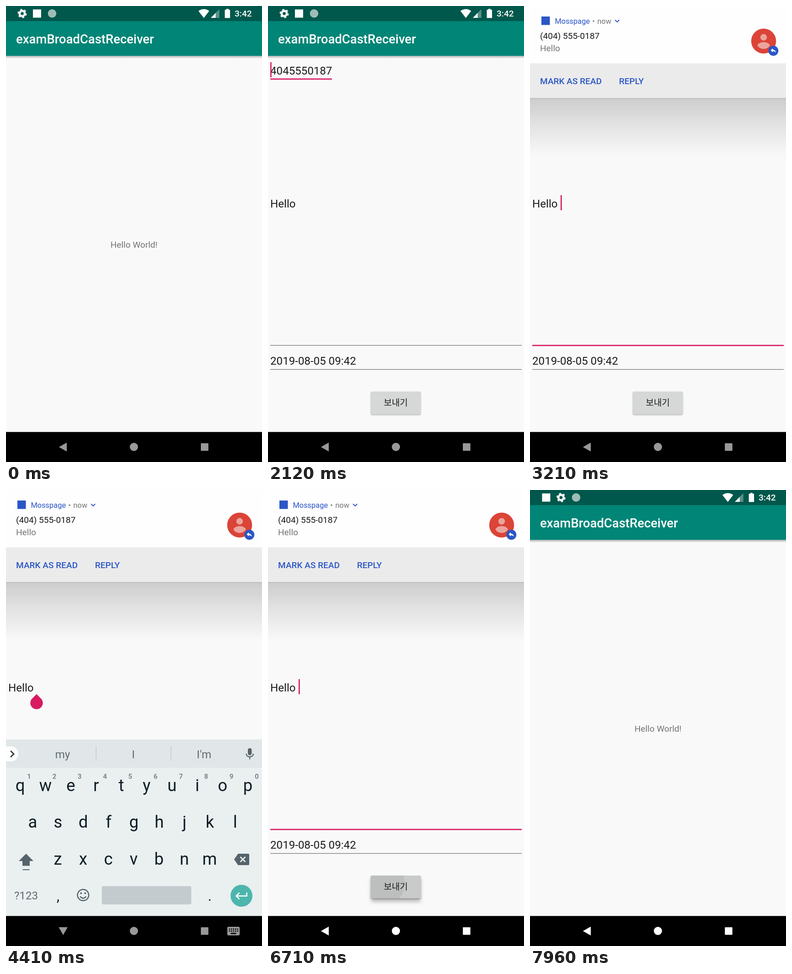
An HTML page that plays this animation: 561 px wide and 998 px high, repeating every 8 s.

```html
<!DOCTYPE html>
<html lang="en">
<head>
<meta charset="utf-8">
<title>examBroadCastReceiver</title>
<style>
html, body { margin: 0; width: 100%; height: 100%; overflow: hidden; background: #f9f9fa; }
#stage { position: relative; width: 561px; height: 998px; max-height: 100%; overflow: hidden; contain: strict; }
svg { position: absolute; left: 0; top: 0; }
text { font-family: Roboto, "Noto Sans CJK KR", "Noto Sans CJK", sans-serif; font-size: 19.1px; white-space: pre; }
.mid { text-anchor: middle; }
.med { font-weight: 500; }
.field { font-size: 24.15px; fill: #1c1c1c; }
.grey { fill: #757575; }
.blue { fill: #2a56c6; }
.small { font-size: 16.4px; }
.key { font-size: 36.5px; fill: #0d1c24; text-anchor: middle; }
.digit { font-size: 15px; font-weight: 700; fill: #7b878d; text-anchor: middle; }
.hint { font-size: 24.2px; fill: #5f6c72; text-anchor: middle; }
.tool { fill: #56646b; }

/* 8 s loop: 1% = 80 ms */
.slide { animation: 8s cubic-bezier(.4, 0, .2, 1) infinite; }
.step { animation: 8s step-end infinite; }

#form { animation-name: form; }
#banner { animation-name: banner; }
#scrim { animation-name: scrim; }
#keys { animation-name: keys; }
#back { animation-name: back; transform-origin: 125px 965px; }
#gear { animation-name: gear; }
#note { animation-name: note; }
#nav { animation-name: nav; }
#kbIcon { animation-name: typing; }
#handle { animation-name: handle; }
#caret1 { animation-name: caret1; }
#caret2 { animation-name: caret2; }
#idleLine { animation-name: idle; }
#focusLine { animation-name: focus; }
#lift, #press { animation-name: press; }
#ripple { animation-name: ripple; transform-origin: 250px 862px; }

@keyframes form {
  0%, 19.5% { clip-path: inset(96% 0 0 0); transform: translateY(41px); visibility: hidden; }
  19.6% { clip-path: inset(96% 0 0 0); transform: translateY(41px); visibility: visible; }
  24.4%, 87% { clip-path: inset(0); transform: none; visibility: visible; }
  92% { clip-path: inset(96% 0 0 0); transform: translateY(41px); visibility: visible; }
  92.1%, 100% { clip-path: inset(96% 0 0 0); transform: translateY(41px); visibility: hidden; }
}
@keyframes banner {
  0%, 29.5% { transform: translateY(-215px); }
  33%, 96.2% { transform: none; }
  98.8%, 100% { transform: translateY(-215px); }
}
@keyframes scrim { 0%, 29.5% { opacity: 0; } 33%, 96.2% { opacity: 1; } 98.8%, 100% { opacity: 0; } }
@keyframes keys {
  0%, 45% { transform: translateY(116px); opacity: 0; }
  48%, 68.1% { transform: none; opacity: 1; }
  70.6%, 100% { transform: translateY(116px); opacity: 0; }
}
@keyframes back {
  0%, 45% { transform: none; }
  47.5%, 68.1% { transform: rotate(-90deg); }
  70.6%, 100% { transform: none; }
}
@keyframes gear { 0% { transform: translate(35.5px, 16.5px); } 32%, 100% { transform: translate(68px, 16.5px); } }
@keyframes note { 0% { transform: translate(68px, 16.5px); } 32%, 100% { transform: translate(35.5px, 16.5px); } }
@keyframes nav { 0% { fill: #999; } 67.5%, 100% { fill: #fff; } }
@keyframes typing { 0% { opacity: 0; } 45% { opacity: 1; } 68.1%, 100% { opacity: 0; } }
@keyframes handle { 0% { opacity: 0; } 43.1% { opacity: 1; } 68.1%, 100% { opacity: 0; } }
@keyframes caret1 { 0% { opacity: 0; } 23.75% { opacity: 1; } 30%, 100% { opacity: 0; } }
@keyframes caret2 {
  0%, 49.375%, 61.875%, 75%, 87.5%, 100% { opacity: 0; }
  38.75%, 55.625%, 68.75%, 81.25% { opacity: 1; }
}
@keyframes idle { 0% { opacity: 1; } 38.75%, 100% { opacity: 0; } }
@keyframes focus { 0% { opacity: 0; } 38.75%, 100% { opacity: 1; } }
@keyframes press { 0%, 82.5% { opacity: 0; } 83.6%, 86% { opacity: 1; } 89%, 100% { opacity: 0; } }
@keyframes ripple {
  0%, 82.4% { transform: scale(.1); opacity: 0; }
  82.5% { transform: scale(.1); opacity: 1; animation-timing-function: linear; }
  83.9% { transform: scale(.52); opacity: 1; animation-timing-function: linear; }
  85.8% { transform: scale(1); opacity: 1; }
  89%, 100% { transform: scale(1); opacity: 0; }
}
</style>
</head>
<body>
<div id="stage">

<!-- first screen -->
<svg width="561" height="998">
  <defs>
    <linearGradient id="drop" x2="0" y2="1">
      <stop stop-opacity=".3"/><stop offset="1" stop-opacity="0"/>
    </linearGradient>
    <linearGradient id="shade" x2="0" y2="1">
      <stop stop-opacity=".18"/><stop offset=".45" stop-opacity=".09"/><stop offset="1" stop-opacity="0"/>
    </linearGradient>
    <filter id="soft" x="-20%" y="-40%" width="140%" height="200%"><feGaussianBlur stdDeviation="1.5"/></filter>
    <filter id="softer" x="-20%" y="-40%" width="140%" height="200%"><feGaussianBlur stdDeviation="4"/></filter>
    <clipPath id="btn"><rect x="225" y="843.7" width="110" height="50" rx="2.7"/></clipPath>
    <g id="bar">
      <rect width="561" height="998" fill="#f9f9fa"/>
      <rect y="109" width="561" height="6" fill="url(#drop)"/>
      <rect y="32" width="561" height="77" fill="#008577"/>
      <text class="med" x="22" y="81.5" fill="#fff" style="font-size:27.5px">examBroadCastReceiver</text>
    </g>
  </defs>
  <use href="#bar"/>
  <text class="mid grey" x="280.5" y="528.5">Hello World!</text>
</svg>

<!-- message form -->
<svg id="form" class="slide" width="561" height="998">
  <use href="#bar"/>
  <text class="field" x="5" y="149.5">4045550187</text>
  <rect x="5" y="158.5" width="135" height="2.7" fill="#d81b60"/>
  <rect id="caret1" class="step" x="5" y="123" width="2.7" height="33" fill="#d81b60"/>

  <text class="field" x="5" y="440.7">Hello</text>
  <rect id="caret2" class="step" x="67" y="414" width="2.7" height="33" fill="#d81b60"/>
  <rect id="idleLine" class="step" x="5" y="742" width="551" height="1.3" fill="#777"/>
  <rect id="focusLine" class="step" x="5" y="741.6" width="551" height="2.7" fill="#d81b60"/>
  <path id="handle" class="step" fill="#d81b60" d="M67 446.8L76.7 456.4A13.7 13.7 0 1 1 57.3 456.4Z"/>

  <text class="field" x="5" y="785">2019-08-05 09:42</text>
  <rect x="5" y="794.8" width="551" height="1.3" fill="#777"/>

  <rect id="lift" class="slide" x="226" y="851" width="108" height="50" fill="#000" fill-opacity=".26" filter="url(#softer)"/>
  <rect x="225.5" y="846" width="109" height="49" rx="2.7" fill="#000" fill-opacity=".32" filter="url(#soft)"/>
  <g clip-path="url(#btn)">
    <rect x="225" y="843" width="110" height="52" fill="#d6d7d7"/>
    <rect id="press" class="slide" x="225" y="843" width="110" height="52" fill="#000" fill-opacity=".06"/>
    <circle id="ripple" class="slide" cx="250" cy="862" r="96" fill="#000" fill-opacity=".06"/>
  </g>
  <text class="mid" x="280" y="875.2" fill="#1c1c1c">보내기</text>
</svg>

<!-- status bar -->
<svg width="561" height="33" fill="#fff">
  <rect width="561" height="33" fill="#00574b"/>
  <g id="gear" class="step" fill="none" stroke="#fff">
    <circle r="5.7" stroke-width="4.4"/>
    <circle r="8.4" stroke-width="3.2" pathLength="12" stroke-dasharray="1"/>
  </g>
  <rect id="note" class="step" x="-9" y="-9" width="18" height="18"/>
  <circle cx="101" cy="16.3" r="8.6" fill="#9dbcb6" stroke="#cfdeda" stroke-width="1.2" stroke-dasharray="1.5 1"/>
  <path d="M433.5 26.3L421.8 11Q433.5 2.6 445.2 11Z"/>
  <path d="M449 26V25.5L467.5 7V26Z" opacity=".35"/>
  <path d="M449 26L459.5 15.3V26Z"/>
  <path d="M479.5 8.2H482.7V6.2H487.8V8.2H491V26.3H479.5Z"/>
  <text class="med" x="501" y="23.3">3:42</text>
</svg>

<!-- heads-up message -->
<svg id="scrim" class="slide" width="561" height="340">
  <rect y="200" width="561" height="130" fill="url(#shade)"/>
</svg>
<svg id="banner" class="slide" width="561" height="215">
  <rect width="561" height="126" fill="#fefefe"/>
  <rect y="125.5" width="561" height="77" fill="#ebebeb"/>
  <rect y="201.8" width="561" height="1.2" fill="#adadad"/>
  <rect class="blue" x="25" y="23" width="18.5" height="18.5"/>
  <text class="blue small" x="54.5" y="38.5">Mosspage</text>
  <text class="grey small" x="136.5" y="38.5">•</text>
  <text class="grey small" x="147.5" y="38.5">now</text>
  <path d="M186.5 30.5L191 35L195.5 30.5" fill="none" stroke="#2a56c6" stroke-width="1.9"/>
  <text x="22" y="72" fill="#1a1a1a">(404) 555-0187</text>
  <text class="grey" x="22" y="98.5">Hello</text>
  <circle cx="512" cy="76.7" r="27.3" fill="#db4437"/>
  <g fill="#eba49d">
    <circle cx="512" cy="68.5" r="7.2"/>
    <path d="M498 86Q502 79 512 79T526 86Q521 94 512 94T498 86Z"/>
  </g>
  <circle class="blue" cx="533.3" cy="98" r="11"/>
  <path fill="#fff" d="M527.5 97L532 92.5V95.3Q538 96 539 102Q536.5 98.9 532 98.9V101.5Z"/>
  <text class="blue med" x="22" y="171">MARK AS READ</text>
  <text class="blue med" x="195" y="171">REPLY</text>
</svg>

<!-- keyboard -->
<svg id="keys" class="slide" width="561" height="933">
  <rect y="546" width="561" height="387" fill="#eaeff0"/>
  <rect y="546" width="561" height="62" fill="#e1e6e8"/>
  <path d="M0 561H10.5A16.5 16.5 0 0 1 10.5 594H0Z" fill="#fdfdfd"/>
  <path d="M10 571L17 577.7L10 584.5" fill="none" stroke="#263238" stroke-width="2.6"/>
  <path d="M197.5 561V593M361.5 561V593" stroke="#c1c9cd" stroke-width="1.4"/>
  <text class="hint" x="124" y="587">my</text>
  <text class="hint" x="279" y="587">I</text>
  <text class="hint" x="434" y="587">I'm</text>
  <g class="tool">
    <rect x="530" y="565" width="8.4" height="15.5" rx="4.2"/>
    <path d="M526.5 577Q527 584 534.2 584T542 577M534.2 584V589.5" fill="none" stroke="#56646b" stroke-width="2.3"/>
    <path d="M44 796L60 812H52V822.5H36V812H28Z"/>
    <rect x="36.5" y="830" width="15" height="2"/>
    <path d="M500 808.5L508.5 796H531Q533 796 533 798V819Q533 821 531 821H508.5Z"/>
  </g>
  <path d="M513.5 803L524.5 814M524.5 803L513.5 814" stroke="#eaeff0" stroke-width="2.6"/>
  <text class="hint" x="44" y="896">?123</text>
  <text class="key" x="114" y="899" style="font-size:31px">,</text>
  <g fill="none" stroke="#56646b" stroke-width="2.5">
    <circle cx="169" cy="886.5" r="12.3"/>
    <path d="M162.5 889.5Q169 897.5 175.5 889.5"/>
  </g>
  <circle class="tool" cx="164.5" cy="882.5" r="2"/>
  <circle class="tool" cx="173.5" cy="882.5" r="2"/>
  <rect x="210" y="867" width="196" height="40" rx="3.5" fill="#c4cbcf"/>
  <text class="key" x="446.5" y="899" style="font-size:31px">.</text>
  <circle cx="516" cy="888" r="24" fill="#4db6ac"/>
  <path d="M527.5 881V888.5H505M511.5 881.5L504.5 888.5L511.5 895.5" fill="none" stroke="#fff" stroke-width="2.6"/>
</svg>

<!-- navigation bar -->
<svg id="nav" class="step" width="561" height="998">
  <rect y="932.3" width="561" height="66" fill="#000"/>
  <path id="back" class="slide" d="M116 965.2L133.2 955.5V975Z"/>
  <circle cx="280.3" cy="965" r="9"/>
  <rect x="427" y="957" width="16.5" height="16.5" rx="1"/>
  <g id="kbIcon" class="step">
    <rect x="485" y="956" width="27" height="18.7" rx="2.5"/>
    <path d="M488.5 961H509M488.5 965.3H509" stroke="#000" stroke-width="2.6" stroke-dasharray="2.6 1.9"/>
    <path d="M492.5 970.5H504.5" stroke="#000" stroke-width="2.6"/>
  </g>
</svg>
</div>

<script>
const board = document.getElementById('keys');
const pitch = 55.45;

function label(cls, x, y, str) {
  const el = document.createElementNS('http://www.w3.org/2000/svg', 'text');
  el.setAttribute('class', cls);
  el.setAttribute('x', x);
  el.setAttribute('y', y);
  el.textContent = str;
  board.append(el);
}

function row(cls, x, y, chars) {
  [...chars].forEach((c, i) => label(cls, x + i * pitch, y, c));
}

row('key', 31, 659, 'qwertyuiop');
row('digit', 50.5, 631.5, '1234567890');
row('key', 58.5, 739, 'asdfghjkl');
row('key', 113.5, 819.5, 'zxcvbnm');
</script>
</body>
</html>
```
